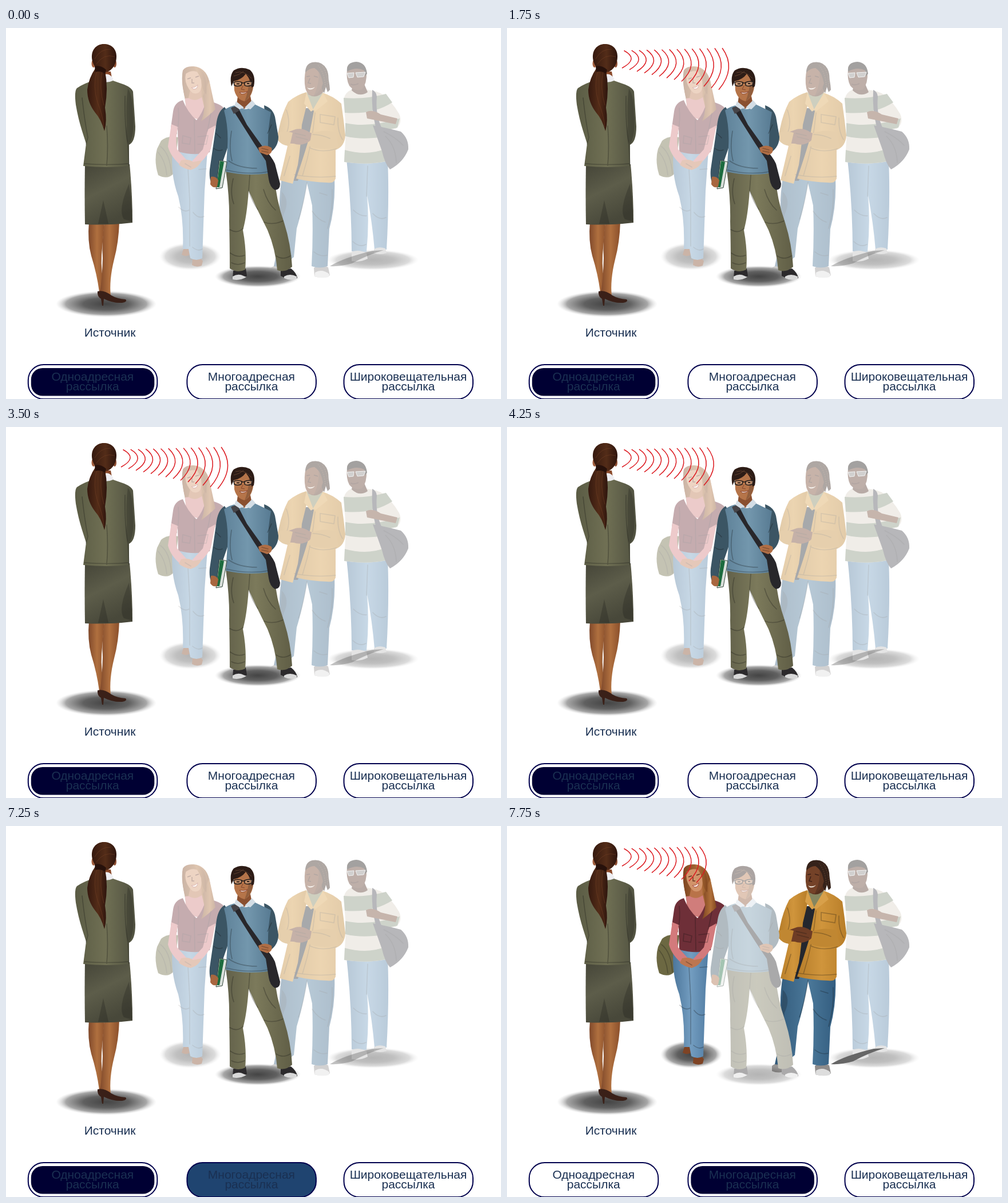
Animation of 865x648 px, one loop 8000 ms. Source, as an HTML page:

```html
<!DOCTYPE html>
<html lang="ru">
<head>
<meta charset="utf-8">
<title>Рассылка</title>
<style>
html, body { margin: 0; width: 100%; height: 100%; overflow: hidden; background: #fff; }
svg { display: block; width: 865px; height: 648px; }
text { font: 21px "Liberation Sans", Arial, sans-serif; fill: #1a3052; text-anchor: middle; }
.fold { fill: none; stroke: #111; stroke-opacity: .28; stroke-width: 1.6; stroke-linecap: round; }
.shade { fill: #111; fill-opacity: .22; }
.faded { filter: url(#fade); }
.faint { opacity: .4; }
#waves { fill: none; stroke: #dc1a20; stroke-width: 1.5; }
.frame { fill: #fff; stroke: #00004d; stroke-width: 2; }
.core { fill: #000033; visibility: hidden; }
.hover .frame { fill: #1f4470; }
.active .core { visibility: visible; }
</style>
</head>
<body>
<svg viewBox="0 0 865 648">
<defs>
  <filter id="fade" filterUnits="userSpaceOnUse" x="0" y="0" width="865" height="648" color-interpolation-filters="sRGB">
    <feColorMatrix values=".4 0 0 0 .6  0 .4 0 0 .6  0 0 .4 0 .6  0 0 0 1 0"/>
  </filter>
  <radialGradient id="ground">
    <stop offset="0" stop-color="#444"/><stop offset=".45" stop-color="#606060"/>
    <stop offset=".8" stop-color="#a2a2a2" stop-opacity=".95"/><stop offset="1" stop-color="#ddd" stop-opacity="0"/>
  </radialGradient>
  <linearGradient id="suit">
    <stop offset="0" stop-color="#5a5b44"/><stop offset=".5" stop-color="#707054"/><stop offset="1" stop-color="#505140"/>
  </linearGradient>
  <linearGradient id="skirt" x2=".4" y2="1">
    <stop offset="0" stop-color="#454538"/><stop offset=".5" stop-color="#5d5d4a"/><stop offset="1" stop-color="#48483a"/>
  </linearGradient>
  <linearGradient id="leg">
    <stop offset="0" stop-color="#80492b"/><stop offset=".5" stop-color="#b0703f"/><stop offset="1" stop-color="#8a4f2b"/>
  </linearGradient>
  <linearGradient id="hair">
    <stop offset="0" stop-color="#35190f"/><stop offset=".55" stop-color="#532c18"/><stop offset="1" stop-color="#2e150d"/>
  </linearGradient>
  <linearGradient id="auburn">
    <stop offset="0" stop-color="#7d4420"/><stop offset=".6" stop-color="#b0703a"/><stop offset="1" stop-color="#824820"/>
  </linearGradient>
  <linearGradient id="denim">
    <stop offset="0" stop-color="#4c769b"/><stop offset=".5" stop-color="#739dc0"/><stop offset="1" stop-color="#527da3"/>
  </linearGradient>
  <linearGradient id="indigo">
    <stop offset="0" stop-color="#31597a"/><stop offset=".55" stop-color="#4b7899"/><stop offset="1" stop-color="#335d80"/>
  </linearGradient>
  <linearGradient id="knit">
    <stop offset="0" stop-color="#5f8299"/><stop offset=".5" stop-color="#7397ad"/><stop offset="1" stop-color="#577a92"/>
  </linearGradient>
  <linearGradient id="khaki">
    <stop offset="0" stop-color="#62614a"/><stop offset=".45" stop-color="#7c7a5b"/><stop offset="1" stop-color="#605e46"/>
  </linearGradient>
  <linearGradient id="coat">
    <stop offset="0" stop-color="#b67d2a"/><stop offset=".5" stop-color="#d0953c"/><stop offset="1" stop-color="#b87e29"/>
  </linearGradient>
</defs>

<!-- woman seen from behind -->
<ellipse cx="175" cy="482" rx="88" ry="23" fill="url(#ground)"/>
<g id="speaker">
  <path d="M145 338Q142 372 149 398Q159 430 163 461L174 462Q165 425 167 396L172 340Z" fill="url(#leg)"/>
  <path d="M172 338Q167 375 169 402Q168 438 164 462L183 468Q180 440 189 404Q197 374 198 338Z" fill="url(#leg)"/>
  <path d="M160 460Q171 457 184 467Q194 473 209 474Q213 478 203 480Q187 481 171 473L170 485H168L166 473Q159 469 160 460Z" fill="#3a2018"/>
  <path d="M138 239L216 238Q221 290 221 340Q180 345 138 343Q137 290 138 239Z" fill="url(#skirt)"/>
  <path class="shade" d="M215 272Q220 305 220 338L206 334Q195 318 215 272ZM170 301L179 342H161Z"/>
  <path d="M162 76H183L187 98H158Z" fill="#8b4a2b"/>
  <path d="M170 82Q180 77 187 88L190 102H166Z" fill="#eeeef2"/>
  <path d="M156 91Q137 96 124 105Q119 110 122 134Q126 158 133 180L140 202L135 241Q177 245 215 241L215 204Q226 199 226 172L222 111Q219 104 207 99L187 92Q175 98 156 91Z" fill="url(#suit)"/>
  <path class="shade" d="M213 106Q222 119 222 151Q225 186 215 204Q209 196 211 169Q209 133 213 106Z"/>
  <path class="fold" d="M133 122Q137 160 143 191L140 203M208 119Q207 170 213 204L215 240M137 237Q178 240 214 237M176 171Q179 209 176 240"/>
  <ellipse cx="153" cy="62" rx="3.500" ry="7" fill="#a35f3e"/>
  <ellipse cx="190" cy="62" rx="3" ry="7" fill="#8f4f32"/>
  <path d="M171 28C158 28 149 38 150 52C151 65 160 76 171 78C184 77 193 64 193 50C193 36 184 28 171 28Z" fill="url(#hair)"/>
  <path d="M157 69Q144 88 142 108Q142 130 156 148Q166 159 172 180Q177 163 173 139Q179 104 173 75Z" fill="url(#hair)"/>
  <path d="M159 73Q151 102 160 130Q169 152 171 173M168 76Q162 104 171 135M155 54Q165 36 183 37M158 63Q171 44 190 50" fill="none" stroke="#7b4528" stroke-opacity=".45"/>
  <path d="M155 67Q165 64 175 73L173 80Q165 74 156 77Z" fill="#27110b"/>
</g>
<text x="181.500" y="538.500">Источник</text>

<!-- student with striped sweater -->
<ellipse class="faint" cx="641" cy="405" rx="80" ry="18" fill="url(#ground)"/>
<g class="faded">
  <path d="M595 230L667 230Q670 302 665 387L644 387Q640 340 631 292Q635 341 630 391L604 390Q604 311 595 230Z" fill="url(#denim)"/>
  <path class="fold" d="M632 241L630 294M607 318Q618 329 630 328M641 324Q653 337 664 331M606 373Q618 384 629 378"/>
  <path d="M604 391Q616 386 630 393L632 403Q618 410 604 407ZM643 386Q652 381 663 385L665 393Q653 397 643 393Z" fill="#bbb"/>
  <path d="M603 108Q592 113 590 125L594 177L591 234Q630 240 664 233L660 177L681 176Q694 166 687 150Q673 126 655 114Q635 105 603 108Z" fill="#dad3c6"/>
  <path d="M590 122Q628 125 664 115L675 130Q641 152 592 148ZM593 166Q633 175 688 158L684 174L660 180V190Q621 196 593 189ZM592 213Q631 224 663 211V233Q631 240 591 234Z" fill="#84907a"/>
  <path d="M640 108Q647 111 648 120Q645 150 657 176L646 173Q638 142 640 108Z" fill="#4b4b54"/>
  <path d="M641 170Q668 175 690 181Q704 193 703 212Q694 235 671 247Q662 237 657 215Z" fill="#4a4a52"/>
  <path class="fold" d="M660 181Q681 191 694 205M663 189Q681 206 682 235"/>
  <path d="M629 147Q640 141 655 151L684 158L681 168L646 161L631 158Z" fill="#71452f"/>
  <path d="M606 98H626L632 112Q618 122 604 109Z" fill="#4d2c20"/>
  <path d="M596 72Q596 60 613 60Q628 61 630 77Q631 97 622 107Q609 112 600 101Q594 90 596 72Z" fill="#5c3727"/>
  <path d="M596 76Q594 60 612 59Q629 60 631 80L627 84L626 74Q612 67 596 76Z" fill="#181412"/>
  <path d="M596 79L608 78L607 86L599 87ZM611 78L628 77L625 85L614 86Z" fill="#8b8987" stroke="#ddd"/>
  <path d="M602 98Q609 101 616 97" fill="none" stroke="#41201a" stroke-width="2"/>
</g>

<!-- student in the yellow jacket -->
<path class="groupcast" d="M566 416Q590 401 641 389L660 388Q630 397 605 411Q585 417 566 416Z" fill="#666"/>
<g class="groupmate">
  <path d="M463 419Q471 412 484 417L489 428Q474 433 463 428ZM538 419Q550 411 563 418L566 432Q553 438 539 434Z" fill="#8f8c8b"/>
  <path d="M540 427Q552 420 565 430L564 435Q551 438 539 434Z" fill="#ddd"/>
  <path d="M482 262H574Q576 311 565 351L562 416Q548 421 534 416Q537 363 535 310Q531 292 526 271Q518 318 508 350L503 400L481 418L468 416Q480 367 478 320Q477 292 482 262Z" fill="url(#indigo)"/>
  <path class="fold" d="M526 269Q520 309 511 334M535 320Q546 336 558 339M538 391Q549 400 561 397M570 282Q572 315 562 350M548 288L561 292"/>
  <path class="shade" d="M482 286Q497 301 485 326Q481 351 493 377L480 403Q484 363 479 327Z"/>
  <path d="M515 140H540L537 184L510 267H503L506 191Z" fill="#24272e"/>
  <path d="M525 112Q507 117 493 129Q482 150 477 176Q472 193 482 202L492 206L478 266L501 272L510 239Q515 208 517 169L525 136Z" fill="url(#coat)"/>
  <path d="M553 113Q572 119 586 132Q590 160 593 187Q592 207 576 213L576 263Q573 272 561 270Q531 269 507 263Q519 228 527 201L538 145L542 118Z" fill="url(#coat)"/>
  <path d="M526 111L553 110L555 120L537 145L524 129Z" fill="#85865f"/>
  <path d="M525 112L521 132L533 146L537 143ZM554 113L562 128L541 145L536 143Z" fill="#d8a04a"/>
  <path class="fold" d="M490 143Q498 166 490 184M482 190L498 194M540 148Q535 205 518 258M549 151L575 155L573 169L549 165ZM536 194Q557 188 577 202M530 209Q551 219 577 211M504 256Q542 263 576 259M580 157Q579 180 588 195M496 224L486 258"/>
  <path d="M483 185L506 177Q519 174 530 182L541 187L530 198Q517 207 503 202L481 201Z" fill="#6e3d25"/>
  <path d="M474 183Q488 178 501 183L496 205Q484 207 475 196ZM534 184Q555 176 575 182L581 207Q554 216 530 206Z" fill="#c08732"/>
  <path class="fold" d="M505 184L523 188M507 190L527 195M536 186Q551 186 566 193"/>
  <path d="M531 103L552 96L555 111Q543 125 528 116Z" fill="#55301e"/>
  <path d="M551 66Q564 76 566 108L562 112L559 103L556 114L552 106Z" fill="#35221a"/>
  <path d="M524 72Q538 62 551 73L555 92Q551 111 538 118Q527 119 523 105Q520 88 524 72Z" fill="#744228"/>
  <path class="shade" d="M546 71L555 92Q551 111 538 118Q549 96 546 71Z"/>
  <path d="M523 78Q523 63 535 60Q552 57 560 71Q565 81 563 96L555 101L552 89Q549 76 539 70Q530 70 523 78Z" fill="#35221a"/>
  <path d="M545 65Q558 80 558 106M553 66Q564 85 562 108" fill="none" stroke="#65452f" stroke-dasharray="2 2"/>
  <path d="M525 85L531 84M538 84L545 86M531 88L528 96L533 97" fill="none" stroke="#3d2017" stroke-width="1.500"/>
  <path d="M526 104Q533 107 540 103Q535 109 529 107Z" fill="#e2d5c8"/>
</g>

<!-- girl with the shoulder bag -->
<ellipse class="groupcast" cx="322" cy="399" rx="54" ry="24" fill="url(#ground)"/>
<g class="groupmate">
  <path d="M301 128Q296 142 299 185L290 190Q296 158 301 128Z" fill="#68643f"/>
  <path d="M271 197Q283 187 301 191L293 254Q283 266 266 257Q258 232 264 211Z" fill="#6c6842"/>
  <path class="fold" d="M270 207Q287 220 289 255M266 217Q279 233 281 257"/>
  <path d="M310 386L322 383L323 395Q316 401 307 396ZM326 403Q337 398 344 407L342 415Q333 419 325 414Z" fill="#7e4324"/>
  <path d="M291 215L352 214Q349 257 347 285L343 402Q333 408 322 402L319 386L309 386Q311 335 301 294Q287 256 291 215Z" fill="url(#denim)"/>
  <path class="fold" d="M318 245L321 301L321 381M302 313Q312 323 320 318M327 322Q336 334 346 329M326 383Q336 391 343 386M337 247L350 246"/>
  <path d="M309 74Q314 66 328 67Q349 69 355 92Q360 111 357 137Q354 155 343 167Q329 148 316 142L311 115Q306 88 309 74Z" fill="url(#auburn)"/>
  <path d="M313 123L342 120L348 145L337 160L315 153Z" fill="#d07d7b"/>
  <path d="M309 126Q294 130 292 146L288 174L300 176L301 216Q330 224 356 217L361 185L380 139Q372 131 350 127Q343 150 333 161Q317 147 309 126Z" fill="#6e2f38"/>
  <path d="M289 168L301 173Q295 191 299 212L317 232L308 242Q288 226 283 207Z" fill="#d37a7c"/>
  <path d="M366 170L358 211Q348 230 332 241L322 236L344 212L353 177Z" fill="#d37a7c"/>
  <path d="M306 231Q319 228 327 234L342 231Q337 244 323 248Q311 246 302 239Z" fill="#bd7650"/>
  <path d="M344 119Q350 140 341 163Q357 151 366 142L355 91Z" fill="url(#auburn)"/>
  <path class="fold" d="M329 160L330 217M309 188L323 192L321 203L308 201ZM335 190L353 188L350 203L335 203M301 140Q303 158 300 176M358 149L352 180M313 237L323 243"/>
  <path d="M322 108L341 104L342 121Q330 130 319 122Z" fill="#b97349"/>
  <path d="M314 80Q326 71 339 79Q345 102 338 112Q328 119 320 107Q311 94 314 80Z" fill="#d1936a"/>
  <path d="M327 67Q316 71 313 84L312 119Q304 86 311 72Q324 63 341 73Q352 83 350 116Q342 109 341 91Q337 79 327 67Z" fill="url(#auburn)"/>
  <path d="M317 89L323 87M331 86L337 84M325 89L325 96L329 96" fill="none" stroke="#68351f" stroke-width="1.400"/>
  <path d="M324 104Q331 104 335 99Q335 107 328 107Z" fill="#f6e3d6" stroke="#a54a40"/>
</g>

<!-- student in the blue sweater -->
<ellipse class="solocast" cx="440" cy="434" rx="75" ry="19" fill="url(#ground)"/>
<g class="solo">
  <path d="M397 424L419 420L421 433Q409 442 396 438ZM480 423L498 420Q508 428 509 437Q495 441 480 433Z" fill="#2c2a2c"/>
  <path d="M396 434Q406 428 415 433L420 435Q408 442 396 439ZM486 434Q496 428 508 434L508 438Q497 442 486 437Z" fill="#d8d8d8"/>
  <path d="M384 249L468 249Q471 298 486 340Q498 378 500 417Q488 428 474 423Q471 386 457 353Q439 318 424 284Q421 328 414 353Q421 391 418 422Q405 429 391 420Q391 374 390 338Q391 298 384 249Z" fill="url(#khaki)"/>
  <path class="fold" d="M426 257L424 284Q431 305 440 317M391 352Q404 360 414 350M392 393Q404 402 417 397M394 410Q405 416 417 410M451 339Q465 345 484 337M472 398Q484 406 497 398M397 263Q391 289 398 307M450 282Q457 306 471 318"/>
  <path d="M382 138Q371 145 368 164L356 247Q354 270 364 276L372 268L377 239L391 198L393 155Z" fill="#3b5564"/>
  <path d="M451 135Q466 140 470 155L476 190Q476 207 462 217L449 208L455 188Z" fill="#3b5564"/>
  <path d="M405 134Q388 137 381 144Q389 173 387 207L384 251Q424 260 464 253L458 211Q457 180 463 147L434 133Q419 150 405 134Z" fill="url(#knit)"/>
  <path class="fold" d="M367 184L375 192M363 210Q370 216 378 213M464 169L457 184M389 232Q407 245 438 245M394 180Q389 210 395 232M385 248Q426 258 463 250"/>
  <path d="M373 231L386 234L378 279L367 281Z" fill="#d9dfda" stroke="#33453b"/>
  <path d="M374 232L381 234L373 278L368 278Z" fill="#1c6b3e"/>
  <path d="M358 260Q366 258 371 266L369 277Q362 281 357 273Z" fill="#a8663f"/>
  <path d="M394 139L404 136L421 169L451 211Q464 224 470 237L479 272Q479 283 470 283Q461 278 459 264L454 232L434 202Z" fill="#28272b"/>
  <path d="M393 140L403 136L408 144L398 150Z" fill="#464448"/>
  <path d="M441 209Q453 202 464 209Q467 219 456 222L443 217Z" fill="#b06e45"/>
  <path class="fold" d="M447 210L458 213M447 215L458 217"/>
  <path d="M405 119H427L430 134L416 141L403 134Z" fill="#8a5030"/>
  <path d="M402 128L416 139L408 142L399 136ZM430 126L417 139L427 142L436 133Z" fill="#d3dde5"/>
  <path d="M398 85Q402 75 423 78Q434 85 432 104Q429 122 417 128Q403 125 399 109Z" fill="#b57449"/>
  <path class="shade" d="M425 84Q434 95 431 107Q427 122 417 128Q425 108 425 84Z"/>
  <path d="M394 102Q390 83 398 74Q411 66 426 73Q437 82 433 102L429 104Q429 92 419 80Q412 90 398 93Z" fill="#2d1c16"/>
  <path d="M401 78Q416 73 429 88M398 84Q408 82 415 76" fill="none" stroke="#5f402e"/>
  <path d="M398 95Q405 92 412 95L411 100Q404 103 399 100ZM417 95Q424 92 431 94L429 100Q421 103 417 100ZM412 96L417 96" fill="#d5ae90" fill-opacity=".5" stroke="#211b1a" stroke-width="1.500"/>
  <path d="M403 97.500H408M421 97H425" stroke="#302018" stroke-width="2"/>
  <path d="M414 101L411 107L417 108" fill="none" stroke="#81452b"/>
  <path d="M408 112Q415 114 422 111Q418 116 411 115Z" fill="#efdfd2" stroke="#8c4431"/>
</g>

<g id="waves"></g>
<g id="buttons"></g>
</svg>

<script>
const LOOP = 8000, STEP = 250, SWITCH = 7500, HOVER = 7250;
// Number of visible arcs in each quarter second; the rest are zero.
const ARCS = [0, 0, 4, 11, 14, 3, 8, 14, 0, 6, 12, 14, 2, 8, 14, 0, 5, 12, 14];
const AFTER_SWITCH = [4, 11];

const $ = id => document.getElementById(id);
const all = selector => [...document.querySelectorAll(selector)];

// Each arc is a parabola whose control point lies twice its depth to the right.
function arc(i) {
  const x = 204.5 + 13.2 * i, top = 39.5 - .35 * i;
  const endX = 201 + 13 * i, bottom = 70 + 2.9 * i;
  const bendX = (x + endX) / 2 + 2 * 14.3, bendY = (top + bottom) / 2 - 1;
  return `<path d="M${x} ${top}Q${bendX} ${bendY} ${endX} ${bottom}"/>`;
}

function button(x, label) {
  return `<g><rect class="frame" x="${x}" y="588" width="225.500" height="60" rx="27"/>
    <rect class="core" x="${x + 5}" y="594" width="215.500" height="48.500" rx="20"/>
    <text x="${x + 112.5}" y="615.500">${label}</text>
    <text x="${x + 112.5}" y="632.500">рассылка</text></g>`;
}

$('waves').innerHTML = Array.from({ length: 14 }, (_, i) => arc(i)).join('');
$('buttons').innerHTML = button(38.8, 'Одноадресная') + button(316.4, 'Многоадресная') + button(590.5, 'Широковещательная');

const waves = [...$('waves').children];
const [single, multi] = $('buttons').children;

function render(time) {
  const t = time % LOOP, group = t >= SWITCH;
  const count = group
    ? AFTER_SWITCH[Math.floor((t - SWITCH) / STEP)]
    : ARCS[Math.floor(t / STEP)] || 0;
  waves.forEach((wave, i) => wave.style.display = i < count ? '' : 'none');

  all('.solo').forEach(el => el.classList.toggle('faded', group));
  all('.groupmate').forEach(el => el.classList.toggle('faded', !group));
  all('.solocast').forEach(el => el.classList.toggle('faint', group));
  all('.groupcast').forEach(el => el.classList.toggle('faint', !group));

  single.classList.toggle('active', !group);
  multi.classList.toggle('active', group);
  multi.classList.toggle('hover', t >= HOVER && !group);
}

const start = performance.now();
function tick() {
  render(performance.now() - start);
  requestAnimationFrame(tick);
}
tick();
</script>
</body>
</html>
```
